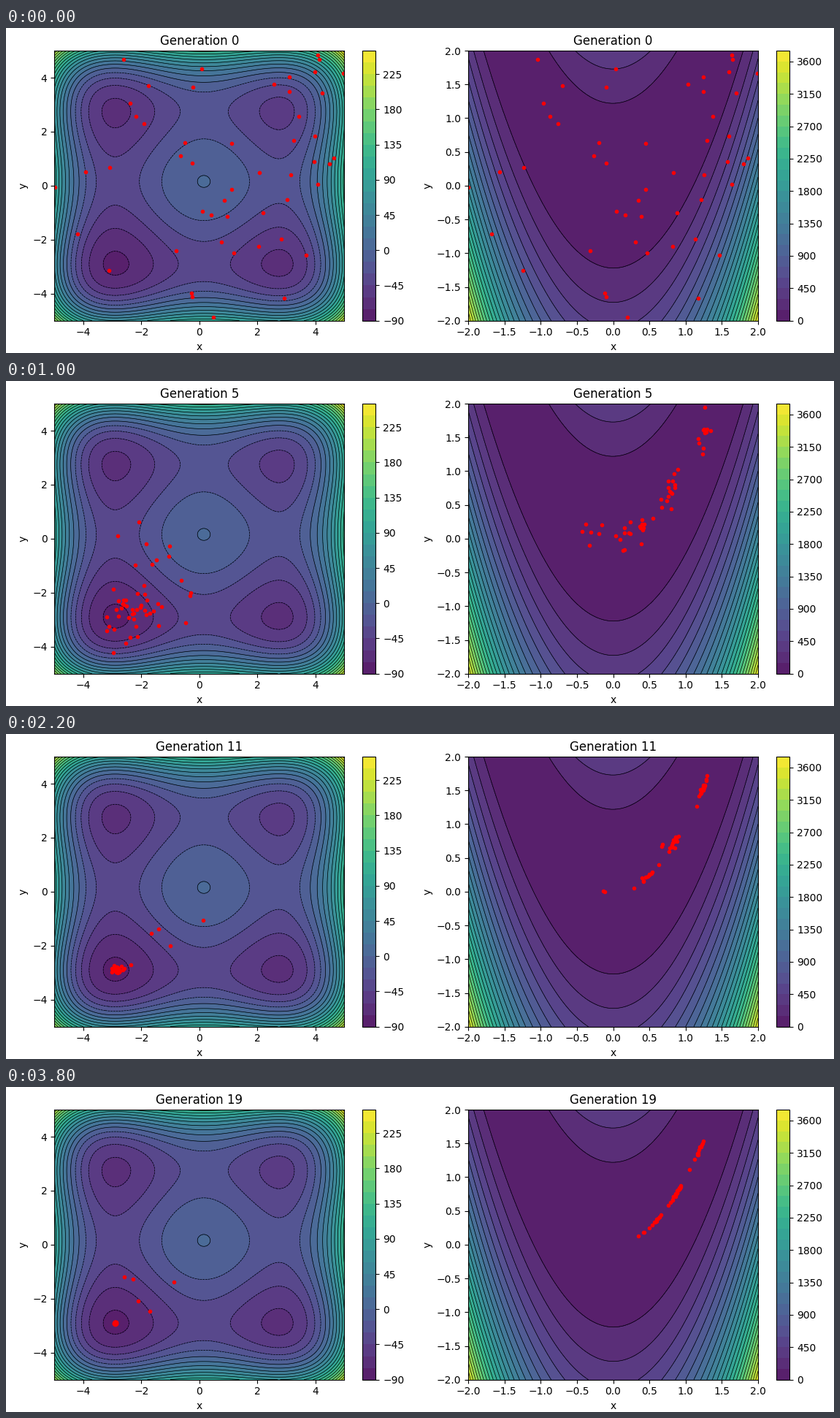
These frames come from a looping animation (1134 by 445 pixels, 4000 ms). A matplotlib script:

```python
import random
from math import exp

import matplotlib.pyplot as plt
import numpy as np
from matplotlib.animation import FuncAnimation

W, H, DPI = 1134, 445, 100
GENERATIONS, POP = 20, 50


def quartic(x, y):
    return sum(v**4 - 16 * v**2 + 5 * v for v in (x, y)) / 2


def valley(x, y):
    return 100 * (y - x**2) ** 2 + (1 - x) ** 2


def first_generation(limit):
    rng = random.Random(0)
    return [(rng.uniform(-limit, limit), rng.uniform(-limit, limit)) for _ in range(POP)]


def evolve(g, limit, cost, survivors, strays, stray, crowd):
    """Early survivors, a few mutated strays, and a crowd closing in on the optimum."""
    start = first_generation(limit)
    if g == 0:
        return start
    rng = random.Random(g)
    points = sorted(start, key=lambda p: cost(*p))[:survivors]
    points += [stray(rng, g) for _ in range(round(strays))]
    points += [crowd(rng, g) for _ in range(POP - len(points))]
    return points


def bowl_spread(g):
    return 1.2 * exp(-0.33 * (g - 2)) + 0.015


def bowl_stray(rng, g):
    return tuple(-2.9 + rng.uniform(0, 3) + rng.gauss(0, 0.7 * bowl_spread(g))
                 for _ in "xy")


def bowl_crowd(rng, g):
    t, s = g - 2, bowl_spread(g)
    return (rng.gauss(-2.9 + 2.4 * exp(-0.52 * t), s),
            rng.gauss(-2.9 + 1.5 * exp(-0.8 * t), s))


def bowl_population(g):
    return evolve(g, 5, quartic, POP >> (2 * g + 1), 4 + 15 * exp(-0.2 * (g - 2)),
                  bowl_stray, bowl_crowd)


def valley_stray(rng, g):
    """A blend of two parents lying on the valley floor."""
    low = -1 + 0.075 * g
    a, b, t = rng.uniform(low, 1.28), rng.uniform(low, 1.28), rng.random()
    return a + t * (b - a), a * a + t * (b * b - a * a)


def valley_crowd(rng, g):
    nests = [1.25, 0.82, 0.42, 0.15, -0.28]
    x = rng.choices(nests, [exp(-g / 6 * (1 - n) ** 2) for n in nests])[0]
    x += (1 - x) * 0.0008 * g**2 + rng.gauss(0, 0.04)
    noise = 0.4 * exp(-0.42 * (g - 2)) + 0.01
    return x + rng.gauss(0, noise / 2), x * x + rng.gauss(0, noise)


def valley_population(g):
    return evolve(g, 2, valley, POP >> g, 4 + 12 * exp(-0.15 * (g - 2)),
                  valley_stray, valley_crowd)


fig = plt.figure(figsize=(W / DPI, H / DPI), dpi=DPI, facecolor="white")


def place(x, w):
    return fig.add_axes([x / W, 44.3 / H, w / W, 369.6 / H])


def panel(x, func, limit, levels, ticks):
    ax, cax = place(x, 397), place(x + 421.8, 18.48)
    side = np.linspace(-limit, limit, 200)
    gx, gy = np.meshgrid(side, side)
    gz = func(gx, gy)
    fill = ax.contourf(gx, gy, gz, levels=levels, cmap="viridis", alpha=0.9)
    ax.contour(gx, gy, gz, levels=levels, colors="black", linewidths=0.5)
    fig.colorbar(fill, cax=cax, ticks=levels[::3])
    cax.minorticks_off()
    ax.set(xlim=(-limit, limit), ylim=(-limit, limit), xticks=ticks, yticks=ticks,
           xlabel="x", ylabel="y")
    dots, = ax.plot([], [], "ro", markersize=3)
    return dots, ax.set_title("Generation 0")


panels = [
    (panel(66.2, quartic, 5, np.arange(-90, 256, 15), np.arange(-4, 5, 2)),
     bowl_population),
    (panel(633, valley, 2, np.arange(0, 3751, 150), np.arange(-2, 2.1, 0.5)),
     valley_population),
]


def update(g):
    artists = []
    for (dots, title), population in panels:
        dots.set_data(*zip(*population(g)))
        title.set_text(f"Generation {g}")
        artists += [dots, title]
    return artists


anim = FuncAnimation(fig, update, frames=GENERATIONS, interval=200, repeat=True,
                     repeat_delay=0, blit=False)
plt.show()
```
